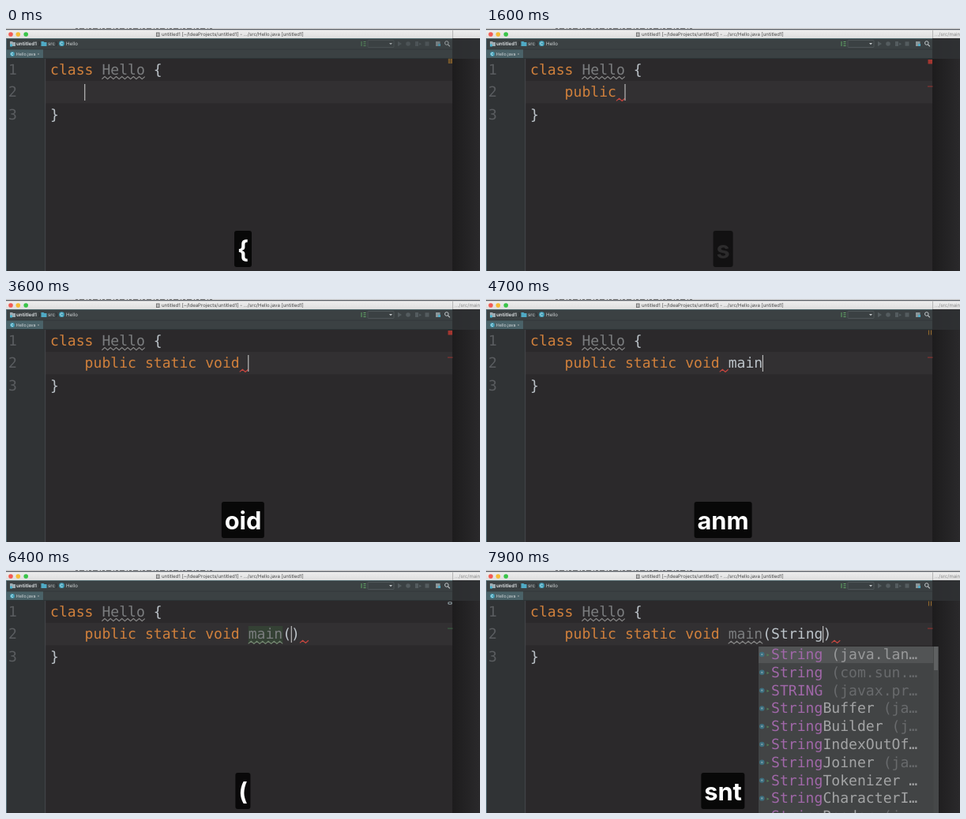
An HTML page that plays this animation: 600x308 px, repeating every 8000 ms.

```html
<!DOCTYPE html>
<html lang="en">
<head>
<meta charset="utf-8">
<title>Typing a main method</title>
<style>
html, body { margin: 0; width: 100%; height: 100%; overflow: hidden; background: #2b292b; }
svg { position: absolute; left: 0; top: 0; display: block; }
text { white-space: pre; text-rendering: geometricPrecision; }
.code { font: 18.1px "DejaVu Sans Mono", monospace; fill: #bcc3c9; }
.ui { font: 6.2px Inter, sans-serif; fill: #d3d7d9; }
.title { font-size: 6.05px; fill: #444; }
.bold { font-weight: 700; }
.num { fill: #5a5d60; }
.kw { fill: #d0803c; }
.dim { fill: #7b7d7f; }
.item { fill: #a3a4a5; }
.hit { fill: #a067a8; }
.pkg { fill: #686a6c; }
.on .pkg { fill: #98999a; }
.wave { fill: none; stroke-width: 1.2; }
#keys {
  position: absolute; left: 300px; top: 257px; height: 46px; padding: 0 3.8px;
  transform: translateX(-50%); border-radius: 3px; color: #fff;
  font: 700 30.8px/48px Inter, sans-serif; white-space: pre;
}
</style>
</head>
<body>
<svg width="600" height="308" viewBox="0 0 600 308">
  <defs>
    <linearGradient id="shade">
      <stop offset="0" stop-color="#1d1c1d"/>
      <stop offset="1" stop-color="#2a292b"/>
    </linearGradient>
    <linearGradient id="bar" x2="0" y2="1">
      <stop offset="0" stop-color="#f2f2f2"/>
      <stop offset="1" stop-color="#dedede"/>
    </linearGradient>
  </defs>

  <!-- window behind -->
  <rect x="565" y="13" width="35" height="295" fill="url(#shade)"/>
  <rect x="565" y="13" width="35" height="26" fill="#303335" opacity=".8"/>

  <!-- title bar -->
  <rect width="600" height="13" fill="url(#bar)"/>
  <rect y="1" width="600" height="1.4" fill="#5b6067"/>
  <path d="M88 .5H262" stroke="#777" stroke-width=".8" stroke-dasharray="3 2 6 3 1 2"/>
  <path d="M565.5 2V13" stroke="#b5b5b5"/>
  <circle cx="6" cy="8" r="2.8" fill="#f35b54"/>
  <circle cx="15.3" cy="8" r="2.8" fill="#f5bd36"/>
  <circle cx="25.2" cy="8" r="2.8" fill="#38c548"/>
  <rect x="190.5" y="6" width="3.6" height="4.6" fill="#bbb" stroke="#666" stroke-width=".8"/>
  <text class="ui title" x="197" y="10.3">untitled1 [~/IdeaProjects/untitled1] - .../src/Hello.java [untitled1]</text>
  <text class="ui title" id="behind" x="568" y="10.3" style="fill:#8a8a8a">.../src/main</text>

  <!-- toolbar and tabs -->
  <rect y="13" width="565" height="26" fill="#3b4143"/>
  <path d="M0 13.5H565" stroke="#4d666a"/>
  <path d="M0 27H565" stroke="#303638" stroke-width=".8"/>
  <rect y="27.4" width="47" height="11" fill="#4a6268"/>
  <path d="M0 38.5H565" stroke="#2c3436"/>
  <path d="M5 17h3l1 1h3v5H5z" fill="#9fabb1"/>
  <rect x="5" y="20.5" width="3" height="3" fill="#4db7d2"/>
  <text class="ui bold" x="13" y="22">untitled1</text>
  <path d="M44.5 17h3l1 1h3v5h-7z" fill="#4fa9c4"/>
  <text class="ui" x="53" y="22">src</text>
  <path d="M41.5 17l1.7 3-1.7 3M63 17l1.7 3-1.7 3" fill="none" stroke="#252a2c" stroke-width=".8"/>
  <circle cx="70.5" cy="19.7" r="3.4" fill="#3f9fb8"/>
  <text class="ui" x="76" y="22">Hello</text>
  <circle cx="8" cy="33" r="2.9" fill="#3f9fb8"/>
  <path d="M71.8 18.5a1.7 1.7 0 1 0 0 2.4M9.1 32a1.5 1.5 0 1 0 0 2" fill="none" stroke="#dceef2" stroke-width=".8"/>
  <text class="ui" x="12.8" y="35" style="font-size:5.4px">Hello.java</text>
  <path d="M40 32l2 2m0-2l-2 2" stroke="#8d9699" stroke-width=".7"/>

  <g id="tools" fill="none" stroke-width="1">
    <path d="M450 17v6M452.5 17.5h3M452.5 20h3M452.5 22.5h3" stroke="#62a866"/>
    <rect x="458" y="15.5" width="33" height="9" rx="1" stroke="#535b5e" stroke-width=".8"/>
    <path d="M485 19h4l-2 2.3z" fill="#c4c9cb"/>
    <g fill="#545c5f">
      <path d="M496 16.8v6.4l5-3.2z"/>
      <circle cx="509" cy="20" r="2.8"/>
      <path d="M518 17h4v6h-4zM523 18.5l3 1.8-3 1.8z"/>
      <rect x="530.5" y="17.3" width="5" height="5.4"/>
    </g>
    <path d="M544 17h5.5v6H544z" fill="#8b9699"/>
    <path d="M547 20h3v3h-3z" fill="#4fa9c4"/>
    <circle cx="557.8" cy="19" r="2.3" stroke="#c0c6c8"/>
    <path d="M559.5 20.8l2.3 2.5" stroke="#c0c6c8" stroke-width="1.2"/>
  </g>

  <!-- editor -->
  <rect y="39" width="565" height="269" fill="#2b292b"/>
  <rect y="39" width="50" height="269" fill="#303335"/>
  <rect x="50" y="67" width="515" height="28.5" fill="#323032"/>
  <path d="M49.7 39V308" stroke="#4c4f51" stroke-width=".8"/>
  <path d="M.5 13V308" stroke="#58717b"/>
  <text class="code num" x="3" y="59">1</text>
  <text class="code num" x="3" y="87.4">2</text>
  <text class="code num" x="3" y="115.8">3</text>
  <text class="code" x="56" y="59"><tspan class="kw">class</tspan> <tspan class="dim">Hello</tspan> {</text>
  <text class="code" x="56" y="115.8">}</text>
  <path class="wave" id="helloWave" stroke="#858585"/>
  <rect id="glow" x="306.7" y="71" width="43.6" height="21" fill="#344134"/>
  <text class="code" id="line" x="99.6" y="87.4"></text>
  <path class="wave" id="mainWave"/>
  <path class="wave" id="errWave" stroke="#c8463f"/>
  <rect id="caret" y="71" width="1.1" height="21" fill="#c4c4c4"/>

  <!-- inspection marks -->
  <g id="mark"></g>
  <rect id="stripe" x="559" y="73.5" width="6.5" height="1.2"/>

  <g id="popup">
    <rect x="345" y="97" width="228" height="212" fill="#424445"/>
    <rect x="345" y="97" width="221.5" height="21" fill="#525455"/>
    <rect x="566.5" y="97" width="6.5" height="211" fill="#464849"/>
    <rect x="567" y="97" width="5" height="30" fill="#5f6162"/>
  </g>
</svg>
<div id="keys"></div>

<script>
const LOOP = 8000, CW = 10.897, X0 = 56;
const $ = id => document.getElementById(id);
const col = n => X0 + n * CW;
const show = (el, on) => el.setAttribute("visibility", on ? "visible" : "hidden");
const span = (cls, s) => `<tspan class="${cls}">${s}</tspan>`;

function wave(x, end, y) {
  const half = 3.63;
  let d = `M${x} ${y + 1.6}`;
  for (let up = true; x + half <= end + .3; up = !up) d += `L${x += half} ${up ? y - 1.6 : y + 1.6}`;
  return d;
}

// [start, ms per key, text]
const runs = [
  [800, 80, "public "], [1800, 100, "static "], [3200, 100, "void "],
  [4300, 100, "main"], [6000, 100, "("], [7200, 110, "String"]
];
const strokes = runs.flatMap(([t, step, s]) => [...s].map((ch, i) => ({ t: t + i * step, ch })));

// [start, end, [time, keys]...]
const casts = [
  [-900, 400, [-900, "{"]],
  [500, 1300, [500, "p"], [600, "pu"], [700, "pbu"], [1000, "lci"]],
  [1600, 2700, [1600, "s"], [1800, "st"], [1900, "sat"], [2100, "tic"]],
  [3000, 4000, [3000, "v"], [3200, "vo"], [3400, "oi"], [3500, "oid"]],
  [4200, 5500, [4200, "m"], [4300, "am"], [4500, "anm"]],
  [5800, 6600, [5800, "("]],
  [7000, 9000, [7000, "s"], [7300, "st"], [7500, "srt"], [7700, "snt"]]
];

const marks = {
  warn: '<path d="M559.8 38.8h5.2v6.2h-5.2z" fill="#c98a2b"/><path d="M562.3 39v5.5" stroke="#5c4a2a" stroke-width=".8"/>',
  error: '<path d="M559.5 40h5.5v5.5h-5.5z" fill="#a33630"/>',
  wait: '<path d="M560.5 39.5v6M563.5 39.5v6" stroke="#94692c" stroke-width="1.1"/>',
  eye: '<ellipse cx="562" cy="42" rx="3" ry="2" fill="#747f83"/><circle cx="562" cy="42" r="1" fill="#2b292b"/>'
};
const markAt = t => t < 1300 ? "warn" : t < 4300 ? "error" : t < 6000 ? "wait" : t < 7200 ? "eye" : "wait";

const rows = ["String (java.lan…", "String (com.sun.…", "STRING (javax.pr…", "StringBuffer (ja…",
  "StringBuilder (j…", "StringIndexOutOf…", "StringJoiner (ja…", "StringTokenizer …",
  "StringCharacterI…", "StringReader (ja…"];
$("popup").innerHTML += rows.map((s, i) => {
  const y = 107 + i * 22.8, p = s.includes("(") ? s.indexOf("(") : s.length;
  return `<circle cx="349.3" cy="${y}" r="3.2" fill="#3d7080"/><circle cx="349.3" cy="${y}" r="1.1" fill="#86a5ae"/>
    <path d="M355.5 ${y - 1}l3 1.8-3 1.6z" fill="#527f55"/>
    <text class="code item ${i ? "" : "on"}" x="361" y="${y + 6}">${span("hit", s.slice(0, 6))}${s.slice(6, p)}${span("pkg", s.slice(p))}</text>`;
}).join("");
$("helloWave").setAttribute("d", wave(col(6), col(11), 63.2));
$("mainWave").setAttribute("d", wave(col(23), col(27), 91.8));

function drawCode(t) {
  const done = strokes.filter(k => k.t <= t);
  const typed = done.map(k => k.ch).join("");
  const open = typed.includes("(");
  const last = done.length ? done[done.length - 1].t : 0;
  let html = typed.replace(/\b(public|static|void)\b/g, span("kw", "$1"));
  if (open) html = html.replace("main", span("dim", "main")) + ")";
  $("line").innerHTML = html;

  const end = 4 + typed.length;
  $("caret").setAttribute("x", col(end) - .4);
  show($("caret"), (t - last) % 1000 < 500);

  const words = typed.match(/^(?:(?:public|static|void) )+/);
  const err = open ? end + 1 : words ? 3 + words[0].length : 0;
  show($("errWave"), err);
  if (err) $("errWave").setAttribute("d", wave(col(err), col(err + 1), 90.8));

  const fresh = t < 7200;
  show($("glow"), open && fresh);
  show($("mainWave"), open);
  $("mainWave").setAttribute("stroke", fresh ? "#72856f" : "#858585");
  show($("stripe"), t >= 1300);
  $("stripe").setAttribute("fill", open && fresh ? "#3a5f40" : "#8a3431");
}

function drawKeys(t) {
  const box = $("keys"), cast = casts.find(c => t >= c[0] && t < c[1] + 300);
  box.style.display = cast ? "block" : "none";
  if (!cast) return;
  const [start, end, ...steps] = cast;
  const a = Math.max(0, Math.min(1, (t - start + 100) / 300, (end + 300 - t) / 300));
  box.textContent = steps.filter(s => s[0] <= t).pop()[1];
  box.style.background = `rgba(8,8,8,${.55 + .43 * a})`;
  box.style.color = `rgba(255,255,255,${a * a})`;
}

let shown = -1;
function frame(now) {
  const t = Math.floor(now % LOOP / 100) * 100;
  if (t !== shown) {
    shown = t;
    drawCode(t);
    drawKeys(t);
    $("mark").innerHTML = marks[markAt(t)];
    $("mark").setAttribute("opacity", t ? 1 : .5);
    $("tools").setAttribute("opacity", t ? 1 : .7);
    show($("behind"), t > 0);
    show($("popup"), t >= 7500);
  }
  requestAnimationFrame(frame);
}
frame(performance.now());
</script>
</body>
</html>
```
